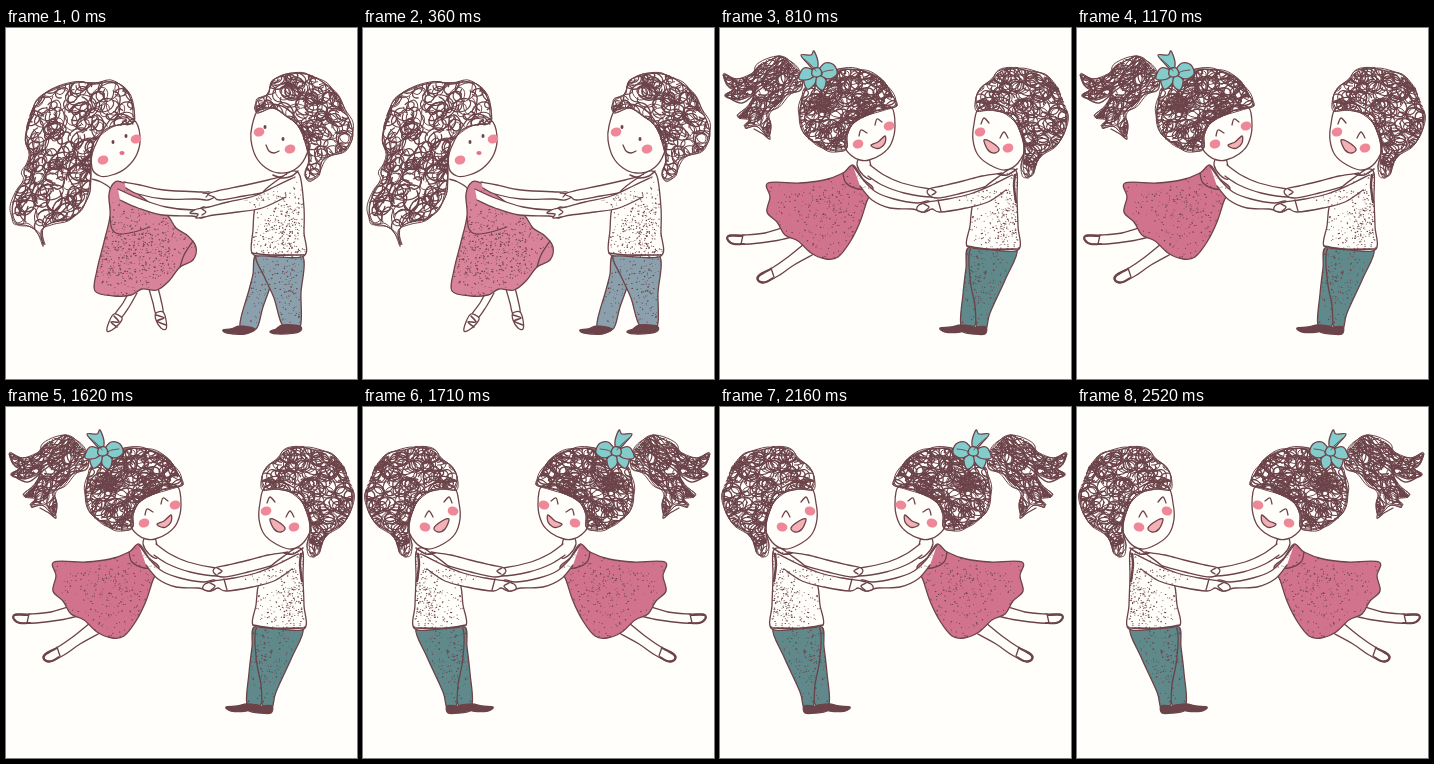
Animation, 351 px wide and 351 px high, one loop 2.61 s. Source, as an HTML page with a canvas:

```html
<!DOCTYPE html>
<html lang="en">
<head>
<meta charset="utf-8">
<title>Dancing couple</title>
<style>
  html, body { margin: 0; height: 100%; overflow: hidden; background: #fffefa; }
  canvas { display: block; width: 100vw; height: 100vh; }
</style>
</head>
<body>
<canvas id="stage" width="351" height="351"></canvas>
<script>
const ctx = document.getElementById('stage').getContext('2d');
const PAPER = '#fffefa', INK = '#6b4348', BLUSH = '#ee8798';
let seed;

function random() {
  seed = (seed * 16807) % 2147483647;
  return seed / 2147483647;
}
const spread = size => (random() + random() + random() - 1.5) * size;

// Smooth curve through "x,y x,y ..." points, each moved by up to `jitter`.
function curve(text, closed = false, jitter = 0) {
  const pts = text.split(' ').map(pair =>
    pair.split(',').map(v => +v + (random() - .5) * 2 * jitter));
  const n = pts.length;
  const at = i => closed ? pts[(i + n) % n] : pts[Math.max(0, Math.min(n - 1, i))];
  const path = new Path2D();
  path.moveTo(...pts[0]);
  for (let i = 0; i < (closed ? n : n - 1); i++) {
    const [a, b, c, d] = [at(i - 1), at(i), at(i + 1), at(i + 2)];
    path.bezierCurveTo(b[0] + (c[0] - a[0]) / 6, b[1] + (c[1] - a[1]) / 6,
      c[0] - (d[0] - b[0]) / 6, c[1] - (d[1] - b[1]) / 6, c[0], c[1]);
  }
  if (closed) path.closePath();
  return path;
}

function line(text, width = 1.3, color = INK) {
  ctx.lineWidth = width;
  ctx.strokeStyle = color;
  ctx.stroke(curve(text));
}

function area(text, fill = PAPER, closed = true, width = 1.3) {
  const path = curve(text, closed);
  ctx.fillStyle = fill;
  ctx.fill(path);
  ctx.lineWidth = width;
  ctx.strokeStyle = INK;
  ctx.stroke(path);
  return path;
}
const limb = text => area(text, PAPER, false);

function dot(x, y, rx, ry = rx, color = INK, turn = 0) {
  ctx.fillStyle = color;
  ctx.beginPath();
  ctx.ellipse(x, y, rx, ry, turn, 0, 7);
  ctx.fill();
}

const blush = (x, y) => dot(x, y, 5.4, 4.5, BLUSH, -.3);

// Ink specks gathered around a centre, kept inside a shape.
function specks(path, x, y, w, h, count) {
  ctx.save();
  ctx.clip(path);
  for (let i = 0; i < count; i++)
    dot(x + spread(w), y + spread(h), .35 + random() * .6, .3 + random() * .5);
  ctx.restore();
}

// Curly scribble: open loops inside an outline, with a loose edge.
function hair(text, count, [x, y, w, h], turn = 0, stretch = 1.4) {
  ctx.save();
  ctx.clip(curve(text, true, 1));
  ctx.strokeStyle = INK;
  for (let i = 0; i < count; i++) {
    const r = 3.5 + random() * 5, start = random() * 6.3;
    ctx.lineWidth = .9 + random() * .6;
    ctx.beginPath();
    ctx.ellipse(x + random() * w, y + random() * h, r * stretch, r,
      turn + spread(1), start, start + 3.5 + random() * 2.5);
    ctx.stroke();
  }
  ctx.restore();
  ctx.lineWidth = 1;
  for (let i = 0; i < 3; i++) ctx.stroke(curve(text, true, 1.6));
}

function standing() {
  // Girl
  area('88,120 86,140 94,148 106,147 120,140 131,126 134,108 128,92 108,88');
  hair('128,94 126,72 117,58 104,53 88,55 72,54 50,59 33,70 23,92 19,112 24,128 17,144 19,152 ' +
    '10,164 5,180 9,195 22,197 32,205 38,217 36,202 46,195 62,192 74,182 82,166 85,150 84,134 89,114 102,100 116,97',
    330, [5, 53, 123, 150], -.8, 1.5);
  line('32,118 26,140 28,160 14,184 20,194');
  line('70,118 62,146 70,166 52,188');
  dot(107, 114, 1.5, 1.9);
  dot(120, 108, 1.5, 1.9);
  blush(97, 132);
  blush(130, 111);
  dot(116, 125, 2.6, 1.9, '#e36f86');
  limb('123,264 117,275 108,288 114,291 123,279 131,265');
  limb('143,261 147,275 150,286 157,285 155,272 152,260');
  area('108,286 103,294 101,303 106,302 113,296 116,290');
  area('150,285 150,292 155,300 160,301 160,292 157,284');
  line('108,288 113,294 105,294 111,299', 1.6);
  line('150,287 158,290 151,293 160,297', 1.6);
  limb('86,151 95,154 104,160 104,168');
  const dress = area('109,154 103,166 104,188 98,214 91,242 89,263 108,268 125,267 136,261 ' +
    '151,262 163,253 174,239 187,232 190,219 182,208 170,200 162,188 148,178 128,163 118,155', '#d9839a');
  specks(dress, 132, 215, 62, 50, 520);
  specks(dress, 122, 235, 48, 50, 230);
  line('104,189 106,201 113,206 128,204 144,199', 1.2);
  line('187,213 178,227 174,239');
  // Upper pair of arms
  limb('118,154 134,157 158,162 195,164 204,164 209,168 202,172 190,171 158,171 132,166 120,160');
  limb('282,147 262,152 240,157 211,163 202,166 208,169 214,172 238,168 262,164 278,160');
  // Boy
  const left = area('250,226 247,246 243,262 234,298 250,301 257,279 267,250 270,228', '#8aa1ad');
  const right = area('250,228 258,248 268,270 277,298 294,299 295,265 297,229 272,227', '#8aa1ad');
  specks(left, 254, 262, 20, 60, 130);
  specks(right, 284, 262, 24, 68, 230);
  area('234,298 225,301 217,302 221,305 239,306 249,301', INK);
  area('277,297 270,301 264,304 275,306 293,304 294,298', INK);
  const shirt = area('276,149 258,163 249,180 247,202 246,225 262,228 298,228 298,204 298,180 294,148 286,143');
  specks(shirt, 284, 205, 26, 48, 330);
  specks(shirt, 262, 208, 34, 34, 140);
  // Lower pair of arms
  limb('112,161 132,170 160,179 188,182 198,179 203,184 196,190 186,188 156,187 132,180 114,172');
  const sleeve = limb('289,149 270,158 248,168 222,174 203,179 191,181 184,185 192,186 190,190 198,189 208,187 232,184 256,180 280,169');
  specks(sleeve, 262, 171, 36, 12, 70);
  line('196,181 200,184 196,187');
  line('197,165 202,166 200,169');
  line('246,225 264,227 298,227', 1.6);
  area('252,82 246,98 245,112 250,129 260,140 273,145 288,142 299,130 302,112 285,84 266,76');
  hair('251,84 252,72 262,66 266,53 280,47 295,44 308,48 320,56 332,68 338,82 346,96 346,110 ' +
    '339,122 326,127 317,133 312,146 304,152 298,145 304,132 300,116 293,99 281,89 266,80',
    245, [250, 44, 97, 106], .5, 1.3);
  dot(259, 99, 1.5, 1.9);
  dot(277, 111, 1.5, 1.9);
  line('260,117 263,123 268,125 273,123');
  blush(253, 104);
  blush(284, 121);
  line('267,147 276,150 286,148 292,143', 1.6);
}

function swinging() {
  // Girl
  limb('68,198 45,205 24,207 10,207 7,211 13,216 30,216 54,213 76,208');
  limb('84,216 68,229 52,240 40,246 37,251 43,255 58,248 74,237 94,226');
  line('22,208 9,208 8,212 14,216 24,216', 2);
  line('51,241 39,248 39,253 46,254 53,250', 2);
  line('23,207 21,216');
  line('51,240 54,249');
  const dress = area('133,137 123,145 104,152 80,155 48,155 50,169 47,184 57,194 65,207 78,213 ' +
    '91,225 106,231 118,229 130,214 140,194 147,173 153,160 143,151', '#d1738c');
  specks(dress, 110, 170, 54, 32, 170);
  specks(dress, 118, 204, 34, 44, 110);
  specks(dress, 70, 183, 40, 44, 65);
  line('123,145 126,155 138,161 152,161');
  limb('139,129 137,137 143,147 151,151 151,139 149,130');
  // Arms behind
  limb('150,137 164,147 182,155 210,161 219,160 222,165 212,169 184,165 162,157 148,148');
  limb('282,145 262,148 243,153 222,158 209,161 208,166 217,170 242,165 268,158');
  // Boy
  const left = area('249,219 246,240 243,266 241,297 254,299 262,270 272,246 276,222', '#5f898b');
  const right = area('251,220 250,250 255,278 257,301 266,301 270,285 286,250 297,222 274,220', '#5f898b');
  specks(left, 250, 263, 15, 54, 90);
  specks(right, 271, 252, 28, 54, 190);
  area('241,297 231,299 220,300 225,304 240,304 254,299', INK);
  area('257,299 249,302 243,304 254,306 265,306 266,299', INK);
  const shirt = area('281,147 264,160 253,176 250,198 247,218 266,221 298,222 298,198 297,170 297,145 290,141');
  specks(shirt, 289, 180, 18, 52, 240);
  specks(shirt, 268, 204, 34, 30, 130);
  line('247,218 266,221 298,221', 1.6);
  line('295,147 294,158 296,174', 2.4);
  // Arms in front
  const arm = limb('133,138 144,153 156,164 174,171 197,175 208,173 213,178 205,184 192,181 170,180 152,172 140,158');
  specks(arm, 143, 156, 12, 20, 20);
  const sleeve = limb('292,147 272,157 250,166 228,171 208,174 199,177 197,182 204,184 212,181 220,184 246,180 268,174 286,162');
  specks(sleeve, 262, 168, 34, 12, 55);
  line('204,176 209,179 205,183');
  line('211,161 216,164 212,167');
  line('218,172 221,183');
  area('259,80 254,96 253,112 258,127 270,137 285,142 298,135 305,118 297,90 278,76');
  hair('258,82 257,71 262,59 273,52 279,43 294,39 308,42 324,47 335,57 342,72 347,87 345,104 ' +
    '336,117 325,124 317,133 313,146 305,148 302,138 305,123 301,105 291,88 274,81',
    280, [256, 39, 92, 108], .4, 1.35);
  line('261,96 264,90 269,95');
  line('280,110 284,104 288,110');
  area('264,112 271,114 279,121 275,125 268,122', '#f3b0b6');
  blush(260, 104);
  blush(288, 120);
  line('278,146 287,147 297,141', 1.6);
  // Girl's head
  area('125,118 132,128 140,132 149,132 162,126 171,116 175,98 171,79 150,80 130,96');
  hair('82,50 74,38 62,29 50,31 38,38 31,47 17,52 4,46 7,56 14,61 5,68 18,72 33,67 28,79 18,89 ' +
    '30,91 24,99 38,97 47,108 50,97 48,86 58,78 68,66 80,62',
    185, [4, 29, 78, 78], -.6, 2);
  line('3,47 10,60 25,62 42,52 58,45 78,48');
  line('6,68 22,75 38,63 54,51');
  line('34,101 43,106 50,111 47,98');
  hair('176,78 172,65 163,53 150,45 134,41 116,43 100,52 86,60 80,76 80,92 86,108 98,117 112,123 125,121 ' +
    '127,106 135,94 148,87 163,82',
    275, [79, 41, 97, 82], -.5, 1.5);
  const BOW = '#84cbcc';
  area('94,46 84,51 87,61 94,57 98,48', BOW);
  area('98,47 96,57 103,62 106,52', BOW);
  area('96,43 88,36 81,27 91,27 94,23 98,34', BOW);
  area('96,44 84,40 79,51 90,51', BOW);
  area('98,43 105,35 114,37 117,46 109,51 100,47', BOW);
  area('93,41 99,40 102,46 97,49 92,47', BOW);
  line('84,31 92,38 96,43', .9);
  line('113,42 106,43 101,45', .9);
  line('139,108 141,102 147,105');
  line('155,97 157,91 162,94');
  area('151,117 158,114 165,108 165,115 160,120 155,120', '#f3b0b6');
  blush(138, 116);
  blush(169, 98);
}

function mirrored() {
  ctx.setTransform(-1, 0, 0, 1, 350, 0);
  swinging();
}

const LOOP = 2610;
let shown;

function frame(now) {
  const t = now % LOOP;
  const pose = t < 810 ? standing : t < 1710 ? swinging : mirrored;
  if (pose !== shown) {
    shown = pose;
    seed = 4217;
    ctx.setTransform(1, 0, 0, 1, 0, 0);
    ctx.fillStyle = PAPER;
    ctx.fillRect(0, 0, 351, 351);
    ctx.lineCap = ctx.lineJoin = 'round';
    pose();
  }
  requestAnimationFrame(frame);
}
frame(0);
</script>
</body>
</html>
```
